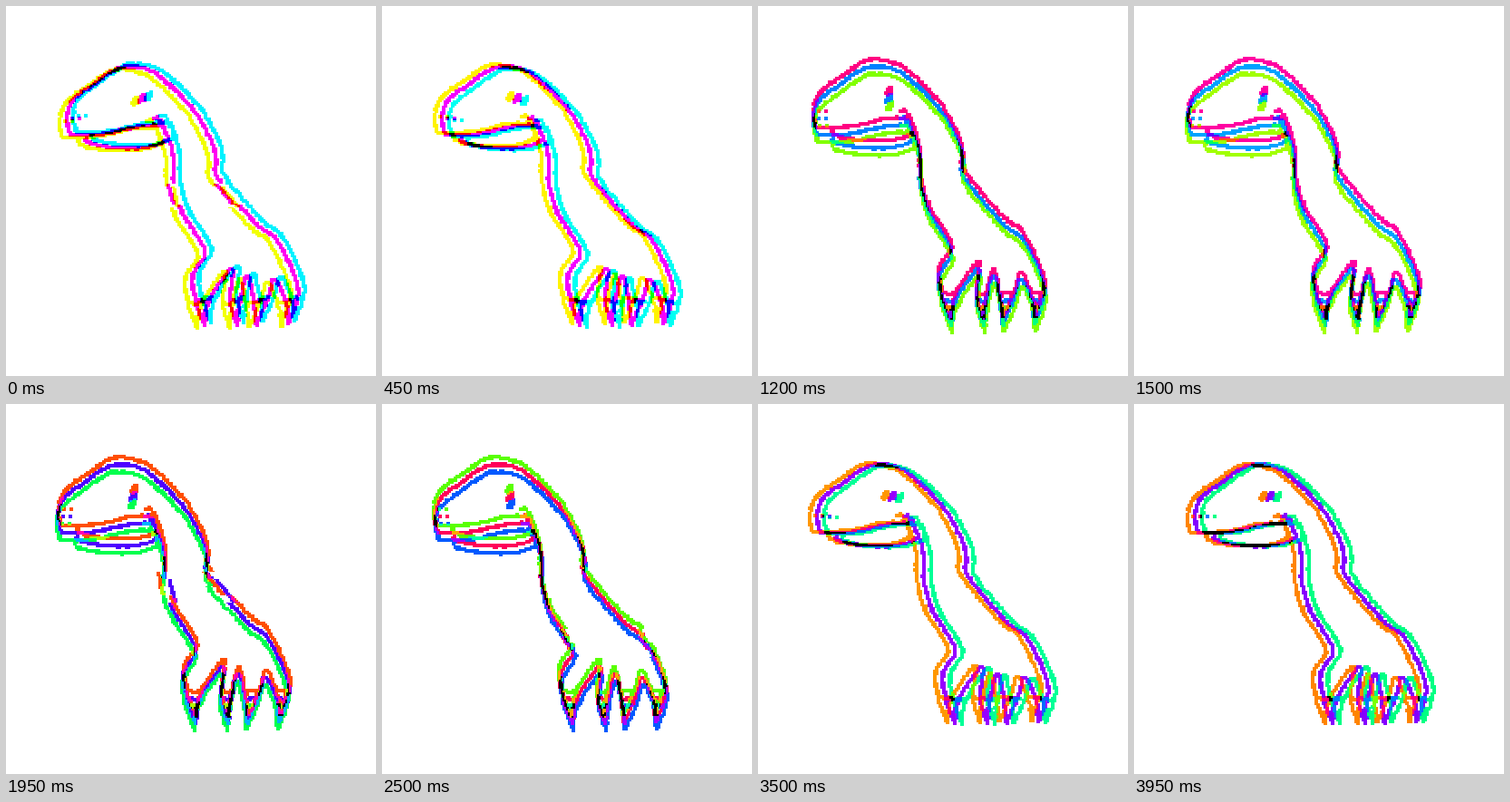
Write an HTML page with a canvas that moves like this. It is 408 px wide and 408 px high and loops after 4000 ms.

```html
<!DOCTYPE html>
<html lang="en">
<head>
<meta charset="utf-8">
<title>Dinosaur</title>
<style>
html, body { margin: 0; width: 100%; height: 100%; overflow: hidden; background: #fff; }
canvas { display: block; width: 408px; height: 408px; }
</style>
</head>
<body>
<canvas id="stage" width="408" height="408"></canvas>
<script>
const SIZE = 408, LOOP = 4000, STEP = 50, CELL = 2, SPREAD = 8;
const FOLD_Y = 325, TIP_Y = 351;

// Key points of smooth strokes
const back = '62,142 58,126 65,104 90,85 112,70 128,67 146,70 161,78 198,115 218,151 223,170 225,190 266,239 287,255 304,285 313,312 311,325 302,351';
const throat = '155,124 162,127 175,163 176,192 185,227 207,262 210,276 197,297 200,325 210,351';
const lip = '62,142 98,141 135,133 163,131';
const jaw = '80,143 81,150 102,155 145,156 171,147';
const eye = '138,105 143,104 144,98 140,100';

// Claws: x of the left edge, tip and right edge, then the gap after it
const claws = [[200, 210, 215, 240, 290], [238, 246, 249, 257, 298], [264, 267, 279, 287, 301], [299, 302, 311]];

const parse = text => text.split(' ').map(pair => pair.split(',').map(Number));

function seeded(seed) {
  return () => {
    seed = (seed * 1664525 + 1013904223) >>> 0;
    return seed / 2 ** 32;
  };
}

function makeCanvas() {
  const c = document.createElement('canvas');
  c.width = c.height = SIZE;
  return c;
}

const rough = seeded(7);
const snap = v => Math.round((v + rough() * 1.6 - 0.8) / CELL - 1) * CELL;
const dot = (ctx, x, y) => ctx.fillRect(snap(x), snap(y), 2 * CELL, 2 * CELL);

function spline(a, b, c, d, u) {
  return b + u / 2 * (c - a + u * (2 * a - 5 * b + 4 * c - d + u * (3 * (b - c) + d - a)));
}

function stroke(ctx, points) {
  const at = i => points[Math.max(0, Math.min(points.length - 1, i))];
  for (let i = 0; i < points.length - 1; i++) {
    const [a, b, c, d] = [at(i - 1), at(i), at(i + 1), at(i + 2)];
    const n = Math.ceil(Math.hypot(c[0] - b[0], c[1] - b[1]) / 1.5);
    for (let k = 0; k <= n; k++) {
      dot(ctx, spline(a[0], b[0], c[0], d[0], k / n), spline(a[1], b[1], c[1], d[1], k / n));
    }
  }
}

function drawLayer(colour) {
  const c = makeCanvas(), ctx = c.getContext('2d');
  ctx.fillStyle = colour;
  for (const path of [back, throat, lip, jaw, eye]) stroke(ctx, parse(path));
  claws.forEach(([left, tip, right, gapX, gapY], i) => {
    stroke(ctx, [[left, FOLD_Y], [right, FOLD_Y]]);
    const next = claws[i + 1];
    if (next) stroke(ctx, [[tip, TIP_Y], [right, FOLD_Y], [gapX, gapY], [next[0], FOLD_Y], [next[1], TIP_Y]]);
  });
  ctx.fillRect(62, 122, 4, 4);
  ctx.fillRect(70, 122, 4, 4);
  return c;
}

const layers = ['#ff0', '#f0f', '#0ff'].map(drawLayer);
const stage = document.getElementById('stage').getContext('2d', { willReadFrequently: true });

// Now and then a band of rows slips sideways
function makeTear(step) {
  const rand = seeded(step * 7919 + 12345);
  rand();
  if (rand() > 0.3) return { top: 0, bottom: 0, shift: [0, 0, 0] };
  const top = Math.round(60 + rand() * 250);
  const bottom = top + Math.round(10 + rand() * 20);
  return { top, bottom, shift: layers.map(() => Math.round(rand() * 16 - 8)) };
}

function drawRows(layer, top, bottom, x, y) {
  if (bottom > top) stage.drawImage(layer, 0, top, SIZE, bottom - top, x, y + top, SIZE, bottom - top);
}

function pureColour(hue) {
  const h = ((hue % 360) + 360) % 360 / 60;
  return [0, 4, 2].map(n => 255 * Math.max(0, Math.min(1, Math.abs((h + n) % 6 - 3) - 1)));
}

// Turn the hue of every mixed ink; black and white stay
function rotateHue(turn) {
  const palette = [0, 120, 60, 240, 300, 180].map(h => pureColour(h + turn));
  const slot = { 1: 0, 2: 1, 3: 2, 4: 3, 5: 4, 6: 5 };
  const image = stage.getImageData(0, 0, SIZE, SIZE), d = image.data;
  for (let i = 0; i < d.length; i += 4) {
    const ink = (d[i] > 127) + 2 * (d[i + 1] > 127) + 4 * (d[i + 2] > 127);
    if (ink > 0 && ink < 7) d.set(palette[slot[ink]], i);
  }
  stage.putImageData(image, 0, 0);
}

function render(t) {
  const p = t / LOOP, w = 2 * Math.PI * p;
  const angle = (41.5 + 20 * p - 53.5 * Math.cos(w) + 16 * Math.sin(w) - 8 * Math.cos(2 * w)) * Math.PI / 180;
  const turn = -7 - 31 * p + 10 * Math.cos(w) - 53 * Math.sin(w) + 35 * Math.sin(2 * w);
  const drift = 4 + 5 * Math.cos(w - 0.16);
  const { top, bottom, shift } = makeTear(t / STEP);

  stage.globalCompositeOperation = 'source-over';
  stage.fillStyle = '#fff';
  stage.fillRect(0, 0, SIZE, SIZE);
  stage.globalCompositeOperation = 'multiply';
  layers.forEach((layer, k) => {
    const x = Math.round(drift + (k - 1) * SPREAD * Math.cos(angle));
    const y = Math.round((k - 1) * SPREAD * Math.sin(angle));
    drawRows(layer, 0, top, x, y);
    drawRows(layer, top, bottom, x + shift[k], y);
    drawRows(layer, bottom, SIZE, x, y);
  });
  rotateHue(turn);
}

const start = performance.now();
let shown = -1;
function tick() {
  const t = Math.floor((performance.now() - start) % LOOP / STEP) * STEP;
  if (t !== shown) render(shown = t);
  requestAnimationFrame(tick);
}
tick();
</script>
</body>
</html>
```
